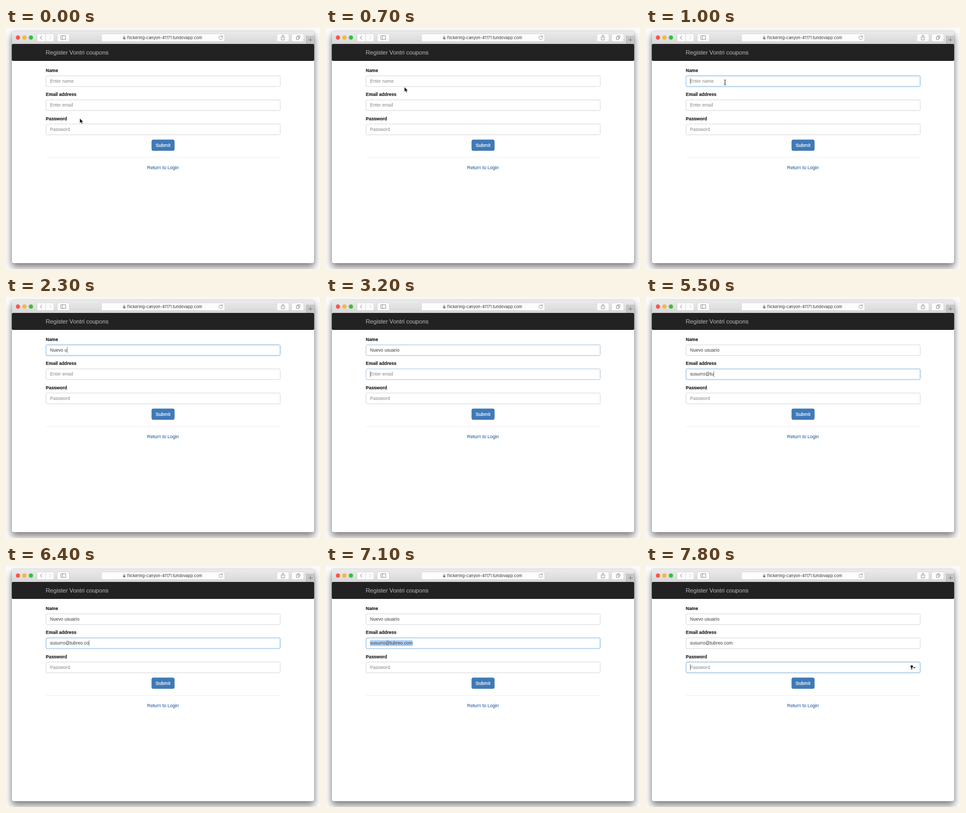
Write an HTML page that moves like this. It is 592x454 px and loops after 8 s.

```html
<!DOCTYPE html>
<html lang="en">
<head>
<meta charset="utf-8">
<title>Sign-up form</title>
<style>
  html, body { margin: 0; width: 100%; height: 100%; overflow: hidden; background: #fff; }
  svg { display: block; }
  text { font: 8.6px "Liberation Sans", Arial, sans-serif; color: #3c3c3c; fill: currentColor; white-space: pre; }
  .label, .brand, .submit, .link { stroke: currentColor; stroke-width: .18; }
  .label { font-weight: bold; font-size: 8.5px; color: #222; }
  .hint { color: #868686; }
  .brand { font-size: 11.15px; color: #a6a6a6; }
  .submit { font-size: 9px; color: #fff; }
  .link { font-size: 8.75px; color: #2f62a0; stroke-width: .1; }
  .url { font: 7.5px Inter, sans-serif; color: #333; }
  .box { fill: #fff; stroke: #ccc; }
  .glow { fill: none; stroke: #8cc1ee; filter: drop-shadow(0 0 1.5px rgba(102, 175, 233, .55)); }
  .tool { fill: #fcfcfc; stroke: #d2d2d2; stroke-width: .8; }
  .icon { fill: none; stroke: #808080; stroke-width: .8; }
  .window { filter: drop-shadow(0 7px 7px rgba(0, 0, 0, .42)) drop-shadow(0 0 1px rgba(0, 0, 0, .3)); }
</style>
</head>
<body>
<svg width="592" height="454" viewBox="0 0 592 454">
  <defs>
    <linearGradient id="bar" x2="0" y2="1">
      <stop stop-color="#ebebeb"/><stop offset="1" stop-color="#d5d5d5"/>
    </linearGradient>
  </defs>
  <rect width="592" height="454" fill="#fbfbfb"/>
  <rect class="window" x="11" y="6.5" width="570" height="436.5" rx="4" fill="#fff"/>

  <path d="M11 32V10.5a4 4 0 0 1 4-4H577a4 4 0 0 1 4 4V32Z" fill="url(#bar)"/>
  <circle cx="22.5" cy="18" r="3.9" fill="#fb5450"/>
  <circle cx="34.7" cy="18" r="3.9" fill="#fdb62f"/>
  <circle cx="47" cy="18" r="3.9" fill="#2fc440"/>
  <g class="tool">
    <rect x="58.5" y="11" width="32" height="14.5" rx="2"/>
    <path d="M74.5 11v14.5"/>
    <rect x="96.5" y="11" width="23" height="14.5" rx="2"/>
    <rect x="180" y="11" width="232.5" height="14.5" rx="2"/>
    <rect x="510.5" y="11" width="23" height="14.5" rx="2"/>
    <rect x="538.5" y="11" width="23" height="14.5" rx="2"/>
  </g>
  <g class="icon">
    <path d="M68 14.8l-3.3 3.4 3.3 3.4" stroke="#666"/>
    <path d="M81.5 14.8l3.3 3.4-3.3 3.4" stroke="#c4c4c4"/>
    <path d="M103.5 14.5h9v7h-9zM106.5 14.5v7"/>
    <path d="M407.5 16.3a3.3 3.3 0 1 0 .7 2.2M408 13.8v2.8h-2.8"/>
    <path d="M520.5 16.5h-1.5v6h6v-6h-1.5M522 19.5v-6M520 15.2l2-2 2 2"/>
    <path d="M547.5 16.5h4.5v5h-4.5zM549.5 16.5v-2h4.5v5h-2"/>
    <path d="M221.6 18v-1.5a1.3 1.3 0 0 1 2.6 0V18"/>
  </g>
  <rect x="220.8" y="17.8" width="4.2" height="3.5" rx=".4" fill="#808080"/>
  <text class="url" x="228.6" y="20.9">flickering-canyon-41171.tundovapp.com</text>
  <path d="M566 14.5h15V30h-15z" fill="#c6c6c6"/>
  <path d="M566.5 14.5V30" stroke="#b4b4b4"/>
  <path d="M570 22.5h8M574 18.5v8" stroke="#808080"/>

  <rect x="11" y="30" width="570" height="32" rx="2.5" fill="#222"/>
  <text class="brand" x="75" y="49.6">Register Vontri coupons</text>

  <g id="form"></g>

  <rect x="274.9" y="210.7" width="42.4" height="20.2" rx="2.5" fill="#3f7ab8" stroke="#3670a8" stroke-width=".8"/>
  <text class="submit" x="296" y="224" text-anchor="middle">Submit</text>
  <path d="M75 244h442" stroke="#eee"/>
  <text class="link" x="296" y="265.6" text-anchor="middle">Return to Login</text>

  <g id="key" fill="#222">
    <circle cx="501" cy="189.3" r="2.4"/>
    <path d="M500.2 190h1.7v5h-1.7z"/>
    <path d="M504 190.3l1.8 1.8 1.8-1.8" fill="none" stroke="#222" stroke-width="1.1"/>
  </g>
  <path id="caret" stroke="#555" stroke-width=".7"/>
  <path id="arrow" d="M0 0V9.500L2.200 7.500 3.800 11 5.500 10.200 4 6.900H7Z" fill="#111" stroke="#fff" stroke-width=".7"/>
  <path id="beam" d="M-2-4.700Q0-4.700 0-3.700Q0-4.700 2-4.700M0-4V4M-2 4.700Q0 4.700 0 3.700Q0 4.700 2 4.700M-1 .8H1" fill="none" stroke="#222" stroke-width=".9"/>
</svg>
<script>
const LOOP = 8000, STEP = 100, LEFT = 83;
const $ = id => document.getElementById(id);
const form = $('form');

function add(tag, attrs, text = '') {
  const node = document.createElementNS('http://www.w3.org/2000/svg', tag);
  for (const name in attrs) node.setAttribute(name, attrs[name]);
  node.textContent = text;
  return form.appendChild(node);
}

function field(y, label, hint) {
  const frame = { x: 75.4, y: y + .4, width: 441.6, height: 20.2, rx: 2.5, 'stroke-width': .8 };
  add('text', { class: 'label', x: 75, y: y - 6.6 }, label);
  add('rect', { class: 'box', ...frame });
  const glow = add('rect', { class: 'glow', ...frame });
  const mark = add('rect', { x: LEFT, y: y + 4.5, width: 0, height: 11.5, fill: '#b0d2fb' });
  const text = add('text', { x: LEFT, y: y + 13.3 });
  return { y, hint, glow, mark, text };
}

const name = field(89.7, 'Name', 'Enter name');
const mail = field(135, 'Email address', 'Enter email');
const pass = field(180.5, 'Password', 'Password');

// Each entry: time, number of characters typed by then
const NAME = 'Nuevo usuario', MAIL = 'susurro@tubreo.com';
const nameKeys = [[1500, 1], [1600, 2], [1700, 3], [1900, 5], [2100, 6], [2300, 7],
  [2400, 8], [2500, 10], [2700, 11], [2800, 12], [2900, 13]];
const mailKeys = [[3700, 1], [3800, 2], [3900, 4], [4100, 6], [4300, 7], [5300, 8], [5400, 9],
  [5500, 10], [5600, 11], [5700, 12], [6000, 13], [6100, 14], [6200, 15], [6400, 17], [6500, 18]];

const typed = (text, keys, t) =>
  text.slice(0, keys.reduce((n, [at, count]) => t >= at ? count : n, 0));
const within = (t, from, to) => t >= from && t < to;
const show = (node, on) => node.setAttribute('visibility', on ? 'visible' : 'hidden');

function fill(f, value, glow) {
  f.text.textContent = value || f.hint;
  f.text.setAttribute('class', value ? '' : 'hint');
  f.glow.setAttribute('opacity', glow);
  f.width = value ? f.text.getComputedTextLength() : 0;
}

// Half-strength glow while the focus fades in and out
function focus(t, from, to, fadeIn = STEP) {
  if (!within(t, from, to + STEP)) return 0;
  return within(t, from + fadeIn, to) ? 1 : .5;
}

function moveMouse(t) {
  const p = Math.min(t / 900, 1), e = p * p * (3 - 2 * p);
  const x = 139 + 10 * e, y = 170 - 67.5 * e;
  const overField = [name, mail].some(f => within(y, f.y, f.y + 21));
  show($('arrow'), t < 1500 && !overField);
  show($('beam'), t < 1500 && overField);
  for (const id of ['arrow', 'beam']) $(id).setAttribute('transform', `translate(${x} ${y})`);
}

function draw(time) {
  const t = Math.floor(time % LOOP / STEP) * STEP;
  fill(name, typed(NAME, nameKeys, t), focus(t, 1000, 3200, 0));
  fill(mail, typed(MAIL, mailKeys, t), focus(t, 3200, 7700));
  fill(pass, '', focus(t, 7700, LOOP));

  const selected = within(t, 7100, 7700);
  mail.mark.setAttribute('width', selected ? mail.width : 0);

  const active = t < 3200 ? name : t < 7700 ? mail : pass;
  const blinkedOff = within(t, 1400, 1500) || within(t, 4800, 5300) || within(t, 7000, 7100);
  const x = LEFT + active.width + .4;
  $('caret').setAttribute('d', `M${x} ${active.y + 4.5}v11.5`);
  show($('caret'), t >= 1000 && !selected && !blinkedOff);
  show($('key'), t >= 7800);
  moveMouse(t);
}

function tick() {
  draw(performance.now());
  requestAnimationFrame(tick);
}
tick();
</script>
</body>
</html>
```
